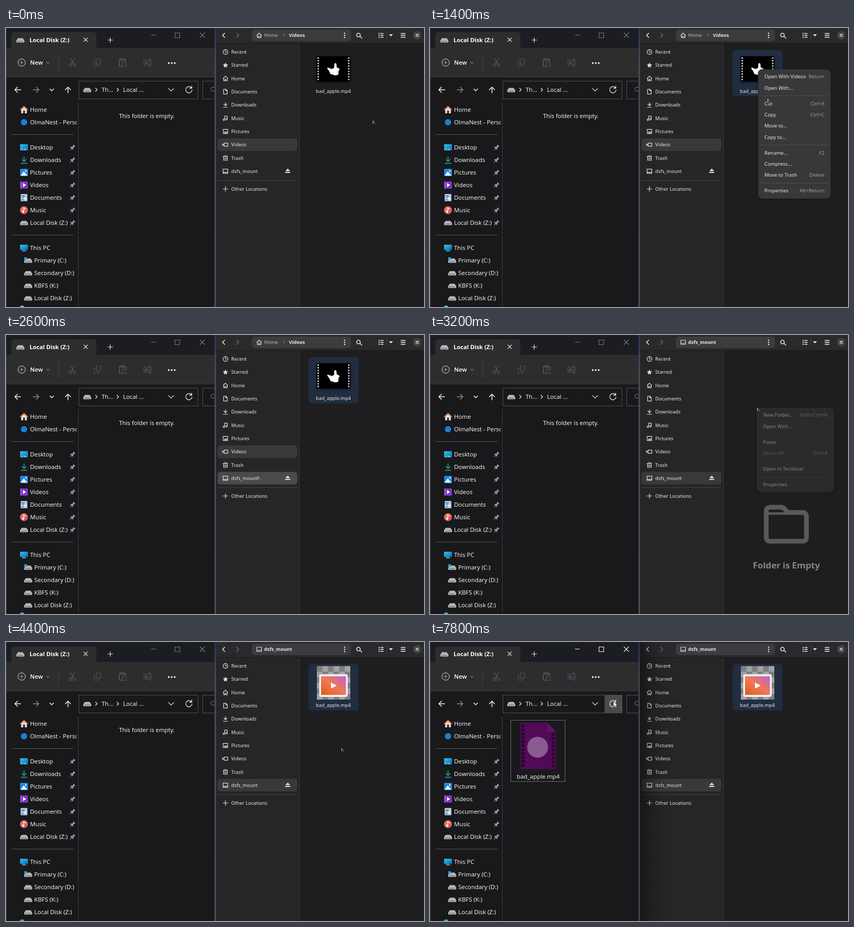
Animation of 800x533 px, one loop 8000 ms. Source, as an HTML page:

```html
<!DOCTYPE html>
<html lang="en">
<head>
<meta charset="utf-8">
<title>Mounted folder</title>
<style>
html,body{margin:0;width:100%;height:100%;overflow:hidden;background:#19191b}
svg{display:block;width:100vw;height:100vh}
text{white-space:pre}
.win{font:11.4px "Open Sans","Noto Sans",sans-serif;fill:#fff}
.gnome{font:9.25px "Noto Sans","Open Sans",sans-serif;fill:#e8e8ea}
.menu{font-size:9.5px}
.b{font-weight:700}
</style>
</head>
<body>
<svg id="stage" viewBox="0 0 800 533" xmlns="http://www.w3.org/2000/svg"></svg>
<script>
const LOOP = 8000, STEP = 100;

// --- drawing helpers ---
const text = (x, cy, s, o = '') => `<text x="${x}" y="${cy + 4}" ${o}>${s}</text>`;
const small = (x, cy, s, o = '') => `<text x="${x}" y="${cy + 3.3}" ${o}>${s}</text>`;
const box = (x, y, w, h, fill, r = 0, o = '') =>
  `<rect x="${x}" y="${y}" width="${w}" height="${h}" fill="${fill}" rx="${r}" ${o}/>`;
const line = (d, c = '#dededf', w = 1.2, o = '') =>
  `<path d="${d}" fill="none" stroke="${c}" stroke-width="${w}" stroke-linecap="round" stroke-linejoin="round" ${o}/>`;
const shape = (d, fill, o = '') => `<path d="${d}" fill="${fill}" ${o}/>`;
const dot = (x, y, r, fill) => `<circle cx="${x}" cy="${y}" r="${r}" fill="${fill}"/>`;
const at = (x, y, s) => `<g transform="translate(${x} ${y})">${s}</g>`;
const group = (id, s, o = '') => `<g id="${id}" ${o}>${s}</g>`;
const repeat = (n, f) => Array.from({length: n}, (_, i) => f(i)).join('');

const defs = `<defs>
<linearGradient id="edge" x2="0" y2="1"><stop stop-color="#2b3257"/><stop offset=".12" stop-color="#474955"/><stop offset="1" stop-color="#4c4c54"/></linearGradient>
<linearGradient id="cast"><stop stop-opacity=".4"/><stop offset=".5" stop-opacity=".14"/><stop offset="1" stop-opacity="0"/></linearGradient>
<linearGradient id="film" x1="0" y1="1" x2="1" y2="0"><stop stop-color="#e3591c"/><stop offset=".5" stop-color="#ee7a52"/><stop offset="1" stop-color="#c061d8"/></linearGradient>
<linearGradient id="sky" x2="1" y2="1"><stop stop-color="#35c4ee"/><stop offset="1" stop-color="#0b6cb8"/></linearGradient>
<linearGradient id="tune" x2="1" y2="1"><stop stop-color="#f08a54"/><stop offset="1" stop-color="#d8446c"/></linearGradient>
<pattern id="check" x="595" y="46" width="21.4" height="21.4" patternUnits="userSpaceOnUse">
<rect width="21.4" height="21.4" fill="#a2a2a5"/><path d="M0 0h10.7v10.7h-10.7zM10.7 10.7h10.7v10.7h-10.7z" fill="#7e7e82"/></pattern>
<filter id="shade" x="-20%" y="-20%" width="140%" height="140%"><feDropShadow dx="0" dy="1" stdDeviation="2.5" flood-opacity=".5"/></filter>
<clipPath id="left"><path d="M1 0h398v533H1z"/></clipPath>
<clipPath id="nav"><path d="M1 142h134.5v391H1z"/></clipPath>
</defs>`;

// --- left window ---
const drive = shape('M3 -3.500h9l3 4h-15z', '#b9b9bc') + box(0, .5, 15, 4, '#e9e9eb', .8) + box(1.2, 1.7, 12.6, 1.6, '#5a5a5e');
const pin = `<g transform="translate(127.5 0) rotate(45)">${shape('M-2.5 -5h5v1l-1 .8v3l2 2v1.2h-7v-1.2l2 -2v-3l-1 -.8z', '#8f9fac')}${line('M0 3v3.5', '#8f9fac', 1)}</g>`;
const monitor = box(0, -6, 15, 10, 'url(#sky)', 1) + box(5, 4, 5, 2, '#2787b8') + box(3, 5.5, 9, 1, '#8fb7cc');

const navIcons = {
  home: shape('M2 -1l5.5 -5l5.5 5v8h-4v-5h-3v5h-4z', '#d8d8da') + line('M.8 0l6.7 -6l6.7 6', '#e07a3c', 2),
  cloud: dot(7.5, 0, 6, '#1683d8'),
  desk: box(0, -6, 15, 12, 'url(#sky)', 1.5) + box(2, 3.5, 3, 1, '#d5f2ff') + box(7, 3.5, 5, 1, '#d5f2ff'),
  down: line('M7.5 -6v9m-4 -4l4 4l4 -4M2 6.5h11', '#24b3a9', 1.4),
  pics: box(0, -7, 15, 14, '#2289d8', 1.5) + shape('M1 6l6 -8l7 8z', '#eef7ff') + dot(11, -3, 1.4, '#fff'),
  film: box(0, -7, 15, 14, '#7b35c0', 1.5) + shape('M5.5 -4l6 4l-6 4z', '#fff') + repeat(4, i => box(1, -5.3 + i * 3, 1.4, 1.4, '#d9b9f2')),
  docs: box(1, -7, 13, 14, '#a9c6de', 1.5) + box(3, -4, 5, 1, '#2f5f88') + box(3, -1.5, 5, 1, '#2f5f88') + box(8, 0, 4, 4, '#e8f2fa') + box(3, 4, 4, 1, '#2f5f88'),
  music: dot(7.5, 0, 7.6, 'url(#tune)') + line('M7 3v-7l4 1.5', '#fff', 1.3) + dot(5.7, 3, 1.9, '#fff'),
  drive, pc: monitor,
  sys: drive + box(0, -6, 5, 5, '#22a6ea')
};
const navRows = [
  ['home', 156, 'Home'], ['cloud', 180, 'OlmaNest - Perso'],
  ['desk', 228, 'Desktop', 1], ['down', 252, 'Downloads', 1], ['pics', 276, 'Pictures', 1],
  ['film', 300, 'Videos', 1], ['docs', 324, 'Documents', 1], ['music', 348, 'Music', 1],
  ['drive', 372, 'Local Disk (Z:)', 1], ['pc', 420, 'This PC'],
  ['sys', 444, 'Primary (C:)', 0, 8], ['drive', 468, 'Secondary (D:)', 0, 8],
  ['drive', 492, 'KBFS (K:)', 0, 8], ['drive', 516, 'Local Disk (Z:)', 0, 8]
];
const navList = navRows.map(([icon, y, label, pinned, dx = 0]) =>
  at(27 + dx, y, navIcons[icon]) + text(46 + dx, y, label) + (pinned ? at(0, y, pin) : '')).join('');

const dim = '#43586b';
const toolbar =
  `<circle cx="30" cy="66" r="7" fill="none" stroke="#d4e2ec"/>` + line('M30 63v6M27 66h6', '#5eb4ea', 1.1) +
  text(46, 66, 'New', 'font-weight="600"') + line('M77.5 65l2.8 2.6l2.8 -2.6', '#a9a9ab', 1) + box(100, 50, 1, 32, '#434345') +
  at(127, 66, line('M-4 -8l6 11M4 -8l-6 11', '#66696d', 1) + `<g fill="none" stroke="${dim}" stroke-width="1.2"><circle cx="-4" cy="5" r="2.5"/><circle cx="4" cy="5" r="2.5"/></g>`) +
  at(175, 66, line('M-2 -7h8v10h-8zM-2 -3h-4v10h8v-4', dim)) +
  at(223, 66, line('M-3 -6h-3v13h5M3 -6h3v4M-3 -7.5h6v3h-6z', '#66696d') + line('M0 -1h7v8.5h-7z', dim)) +
  at(271, 66, line('M2 -5h-9v10h9M5 -5h2v10h-2M3.5 -7.5v15M2 -7.5h3M2 7.5h3', dim, 1.1) + line('M-5 3l2.5 -6l2.5 6M-4 1h3', '#66696d', 1)) +
  repeat(3, i => dot(311.5 + i * 5.7, 67, 1.7, '#f4f4f4'));

const address =
  line('M28 118h-11m5 -5l-5 5l5 5', '#f2f2f2', 1.5) + line('M52 118h11m-5 -5l5 5l-5 5', '#8b8b8d', 1.4) +
  line('M84 116.5l3.5 3.5l3.5 -3.5', '#f2f2f2', 1.5) + line('M118.500 124v-11m-5 5l5 -5l5 5', '#f2f2f2', 1.5) +
  box(139.5, 101.5, 228, 34, '#19191b', 0, 'stroke="#505053"') +
  group('hover', box(334, 102, 33, 33, '#4a4a4c')) +
  at(148, 118, drive) + line('M171.500 115l3 3l-3 3', '#e8e8e8', 1.3) + text(183, 118, 'Th...') +
  line('M212.500 115l3 3l-3 3', '#e8e8e8', 1.3) + text(224, 118, 'Local ...') +
  line('M311 115.500l5 5l5 -5', '#d0d0d2', 1.2) + line('M355 114.500a6 6 0 1 0 1 4M355.500 111v4h-4', '#f0f0f0', 1.3) +
  box(376.5, 101.5, 30, 34, '#19191b', 0, 'stroke="#505053"') +
  `<circle cx="396" cy="117" r="4" fill="none" stroke="#77777a"/>`;

const perforations = x => repeat(11, i => box(x, 158 + i * 7.5, 6, 5, '#25052a', 1));
const clip = box(154.5, 149.5, 104, 117, 'none', 0, 'stroke="#6d6d70"') +
  shape('M173 154h51l17 17v72h-68z', '#510a56') + shape('M224 154l17 17h-17z', '#5f1465') +
  perforations(175) + repeat(9, i => box(233, 174 + i * 7.5, 6, 5, '#25052a', 1)) + dot(206, 201, 20, '#8a5a90') +
  text(207, 256.5, 'bad_apple.mp4', 'text-anchor="middle"');

const leftWindow = `<g class="win" clip-path="url(#left)">` +
  box(1, 0, 398, 40, '#1c1d22') + box(0, 38, 399, 56, '#2d2d2e') + box(10, 8, 163, 36, '#2d2d2e', 6) +
  box(1, 94, 398, 439, '#19191b') + box(0, 93, 399, 1, '#3a3a3c') +
  at(20, 23, drive) + text(45, 23, 'Local Disk (Z:)', 'class="b" font-size="11.2"') +
  line('M149 19l7 7M156 19l-7 7', '#e0e0e0', 1.1) + line('M195 23h9M199.500 18.500v9', '#e8e8e8', 1.2) +
  group('controls', `<path d="M277.500 13.500h9M323.500 9.500h9v9h-9zM371 9l9.500 9.500M380.500 9l-9.500 9.500" fill="none" stroke-width="1.1"/>`) +
  toolbar + address + box(138, 142, 1, 391, '#3c3c3f') +
  `<g clip-path="url(#nav)">${navList}${dot(31, 535, 5, '#4fa9d0')}</g>` +
  box(11, 203, 118, 1, '#55555a') + box(11, 395, 118, 1, '#55555a') +
  group('nothing', text(269.5, 168, 'This folder is empty.', 'text-anchor="middle"')) +
  group('clip', clip) + '</g>';

// --- right window ---
const house = line('M-4.500 0l4.500 -4.300l4.500 4.300M-3.300 -.5v5h2.300v-2.500h2v2.500h2.300v-5');
const disk = line('M-4.500 -4h9v8h-9zM-4.500 2h9');
const placeIcons = [
  line('M0 -4.600a4.600 4.600 0 1 0 .1 0M0 -2.500v2.700h2'),
  shape('M0 -5l1.500 3.300l3.600 .4l-2.700 2.400l.8 3.600l-3.200 -1.900l-3.200 1.900l.8 -3.600l-2.700 -2.400l3.600 -.4z', '#dededf'),
  house,
  line('M-3.500 -4.500h4.500l2.500 2.500v6.500h-7zM.8 -4.300v2.500h2.500'),
  line('M0 -4.500v6m-3 -3l3 3l3 -3M-4 4.500h8'),
  line('M-1.500 2.700v-6.700h5v5.500') + `<g fill="none" stroke="#dededf" stroke-width="1.2"><circle cx="-3" cy="3" r="1.5"/><circle cx="2" cy="2" r="1.5"/></g>`,
  line('M-4.300 -4h8.600v8h-8.600z') + shape('M-3 3l2 -3l1.500 1.500l1.200 -2l1.800 3.500z', '#dededf'),
  line('M-2.500 -3h7v6h-7z') + shape('M-6 -3l3 3l-3 3z', '#dededf'),
  line('M-4.500 -2.800h9M-3.500 -2.800v7.300h7v-7.300M-1.500 -4.500h3M-1 -.5v3M1 -.5v3'),
  disk
];
const rowY = i => 45.7 + i * 25.32;
const places = ['Recent', 'Starred', 'Home', 'Documents', 'Downloads', 'Music', 'Pictures', 'Videos', 'Trash', 'dsfs_mount']
  .map((s, i) => at(420, rowY(i), placeIcons[i]) + small(431, rowY(i), s)).join('');

const header = box(402, 0, 398, 29, '#2a2a2d') + box(402, 29, 398, 1, '#19191b') +
  line('M418.500 10l-4 4l4 4', '#e8e8e8', 1.6) + line('M441.500 10l4 4l-4 4', '#6a6a6d', 1.6) +
  box(471, 3, 189, 22, '#3c3c3f', 5) + repeat(3, i => dot(648, 10 + i * 4, 1.3, '#e8e8e8')) +
  line('M678 16.500l3 3M674.500 10a3.500 3.500 0 1 0 .1 0', '#e8e8e8', 1.5) +
  repeat(3, i => box(713, 9.5 + i * 3.6, 2, 2, '#e8e8e8') + box(716.5, 9.700 + i * 3.6, 6, 1.6, '#e8e8e8')) +
  box(728, 6, 1, 16, '#434346') + shape('M733 12h7.500l-3.750 4z', '#e8e8e8') +
  repeat(3, i => box(755.5, 9.700 + i * 3.6, 9, 1.6, '#e8e8e8')) +
  dot(787, 14, 8.2, '#414144') + line('M784.500 11.500l5 5M789.500 11.500l-5 5', '#f0f0f0', 1.4) +
  group('pathHome', at(484.5, 14, house) + small(494, 14, 'Home', 'fill="#b9b9bb"') + small(530, 14, '/', 'fill="#98989b"') + small(541.5, 14, 'Videos', 'class="b"')) +
  group('pathMount', at(484.5, 14, disk) + small(494, 14, 'dsfs_mount', 'class="b"'));

const fileName = small(626.5, 120.5, 'bad_apple.mp4', 'text-anchor="middle"');
const chosen = id => group(id, box(579, 42, 96, 88.5, '#212d40', 7));
const thumb = box(594.5, 54, 64.5, 48.5, '#000', 2, 'filter="url(#shade)"') +
  [596, 654.5].map(x => repeat(9, i => box(x, 56 + i * 5.1, 3, 3, '#c9c9cb', 1))).join('') +
  shape('M614.500 77q1.500 -2 4 -.5l5 2l4.500 -2.500l.3 -7q1.700 -3.500 4 -.5l.7 7q4.500 .5 5.500 3.500l-2 3l-.5 7q-5 2.500 -9 .5l-6 -1.500q-2 -6 -6.500 -11z', '#fff');
const playCard = box(599.5, 61.5, 54.500, 43.5, '#f1eef0', 4) + box(603, 65.500, 47.500, 35.5, 'url(#film)', 1) + shape('M622 77.500l11 5.800l-11 5.800z', '#fff');

const folder = line('M643.500 386v-49q0 -8 8 -8h20q5 0 8 4l5 6h28q8 0 8 8v39q0 8 -8 8h-61q-8 0 -8 -8z', '#59595c', 9) +
  line('M646 341h36', '#59595c', 5) +
  text(682, 441.5, 'Folder is Empty', 'text-anchor="middle" fill="#858588" style="font-size:16.8px;font-weight:800"');

// items: [y, label, shortcut, dimmed]
function menu(id, x, y, w, h, items, rules, hot) {
  return group(id, box(x, y, w, h, '#38383b', 8, 'stroke="#29292c" stroke-width=".6" filter="url(#shade)"') +
    group(id + 'Hot', box(x + 4, hot, w - 8, 21, '#4b4b4e', 4)) +
    rules.map(r => box(x + 4, r, w - 8, 1, '#4d4d50')).join('') +
    items.map(([cy, s, key = '', off]) => small(x + 12, cy, s, off ? 'fill="#8b8b8e"' : '') +
      small(x + w - 12, cy, key, 'text-anchor="end" fill="#a0a0a3"')).join(''), 'class="menu"');
}
const fileMenu = menu('fileMenu', 628, 79, 139, 247, [
  [93, 'Open With Videos', 'Return'], [114.5, 'Open With…'], [144.5, 'Cut', 'Ctrl+X'], [166, 'Copy', 'Ctrl+C'],
  [187, 'Move to…'], [208.5, 'Copy to…'], [238.5, 'Rename…', 'F2'], [260, 'Compress…'],
  [281, 'Move to Trash', 'Delete'], [311, 'Properties', 'Alt+Return']], [129, 223, 296], 155);
const viewMenu = menu('viewMenu', 625.5, 139, 147.5, 161, [
  [153, 'New Folder…', 'Shift+Ctrl+N'], [174.5, 'Open With…'], [204.5, 'Paste'], [226, 'Select All', 'Ctrl+A', 1],
  [256, 'Open in Terminal'], [286, 'Properties']], [189, 240, 271], 194);

const rightWindow = `<g class="gnome">` +
  box(402, 0, 398, 533, '#1e1e20') + box(402, 29, 159, 504, '#262629') + box(561, 30, 1, 503, '#39393c') + header +
  group('active', box(405, -12, 152.5, 24, '#39393c', 5)) + group('rowHover', box(405, rowY(9) - 12, 152.5, 24, '#4a4a4d', 5)) +
  places + shape('M534.500 273.500l4.700 -5l4.700 5zM534.500 275h9.400v2h-9.400z', '#dededf') +
  box(405, 291, 152.5, 1, '#434346') + line('M415.500 307.500h9M420 303v9') + small(431, 307.5, 'Other Locations') +
  group('fileA', chosen('picked') + thumb + fileName) +
  group('fileB', chosen('pasted') + box(595, 46, 64, 64, 'url(#check)') + group('card', playCard) + fileName) +
  group('folder', folder) + fileMenu + viewMenu + group('shadow', box(401, 0, 55, 533, 'url(#cast)')) + '</g>';

const pointers = group('tick', line('M.5 .5v5M.5 .5l1.500 1.500M3 3.500v.3M3.500 5.500h.4', '#c4c4c6', 1)) +
  group('arrow', shape('M0 0v11l2.600 -2.400l1.800 4l2 -.9l-1.800 -3.900h3.600z', '#fff', 'stroke="#111" stroke-width=".7"'));

const stage = document.getElementById('stage');
stage.innerHTML = defs + box(0, 0, 800, 533, 'url(#edge)') + leftWindow + rightWindow + pointers;
const el = {};
stage.querySelectorAll('g[id]').forEach(g => el[g.id] = g);

// --- motion: pointer stops as [time, x, y] ---
const stops = [
  [300, 702, 177], [1000, 632, 76], [1200, 632, 76], [1400, 646, 135], [1600, 650, 162],
  [1700, 650, 162], [2500, 482, 270], [2600, 482, 270], [3000, 626, 139], [3400, 626, 139],
  [3700, 639, 198], [4000, 642, 203], [6300, 642, 203], [6400, 532, 191], [6700, 400, 145], [7000, 351, 113]
];
function pointerAt(t) {
  const i = stops.findIndex(s => s[0] > t);
  if (i === 0) return stops[0].slice(1);
  if (i < 0) return stops[stops.length - 1].slice(1);
  const [t0, x0, y0] = stops[i - 1], [t1, x1, y1] = stops[i];
  const p = (t - t0) / (t1 - t0), k = p * p * (3 - 2 * p);
  return [x0 + (x1 - x0) * k, y0 + (y1 - y0) * k];
}
const ramp = (t, a, b) => Math.max(0, Math.min(1, (t - a) / (b - a)));
const show = (id, v) => el[id].setAttribute('opacity', +v);

function draw(t) {
  const mounted = t >= 2700, awake = t >= 7300;
  const [x, y] = pointerAt(t), onLeft = x < 400;
  for (const id of ['tick', 'arrow']) el[id].setAttribute('transform', `translate(${x} ${y})`);
  show('tick', !onLeft);
  show('arrow', onLeft);

  show('pathHome', !mounted);
  show('pathMount', mounted);
  el.active.setAttribute('transform', `translate(0 ${rowY(mounted ? 9 : 7)})`);
  show('rowHover', t >= 2400 && t < 2800);
  show('fileA', !mounted);
  show('picked', t >= 1000);
  show('folder', t >= 2800 && t < 4000);
  show('fileB', t >= 4000);
  show('card', t >= 4400);
  show('fileMenu', ramp(t, 1000, 1200) * (1 - ramp(t, 1700, 1900)));
  show('fileMenuHot', t >= 1500);
  show('viewMenu', ramp(t, 3100, 3300) * (1 - ramp(t, 3700, 3900)));
  show('viewMenuHot', t >= 3700);

  show('hover', t >= 6900);
  show('nothing', t < 7400);
  show('clip', t >= 7500);
  show('shadow', ramp(t, 7200, 7400));
  el.controls.setAttribute('stroke', awake ? '#f4f4f4' : '#77787e');
}

function tick() {
  const t = performance.now() % LOOP;
  draw(t - t % STEP);
  requestAnimationFrame(tick);
}
tick();
</script>
</body>
</html>
```
